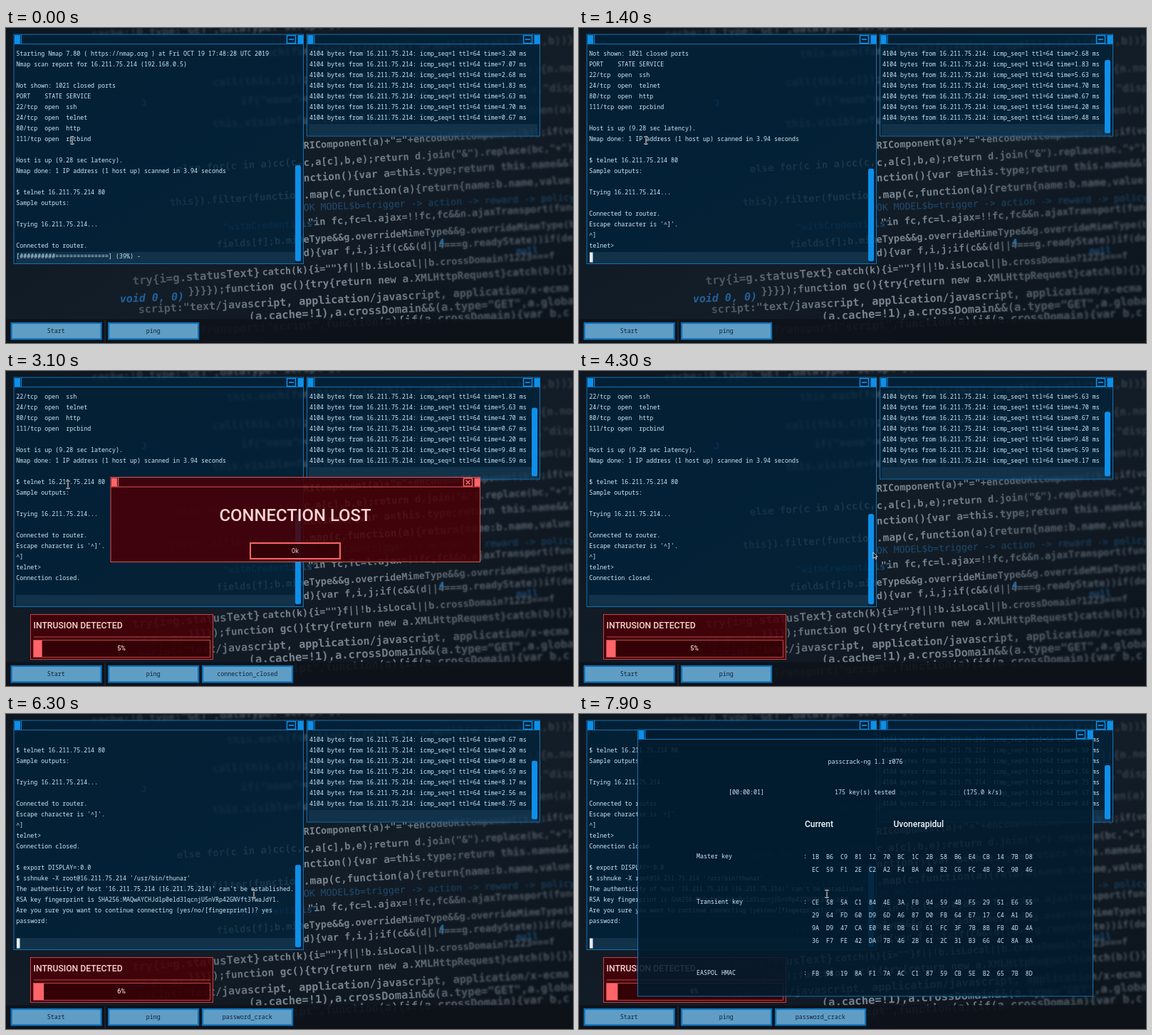
Write an HTML page that moves like this. It is 796 px wide and 443 px high and loops after 8 s.

```html
<!DOCTYPE html>
<html lang="en">
<head>
<meta charset="utf-8">
<title>Terminal desktop</title>
<style>
html, body { margin: 0; width: 100%; height: 100%; overflow: hidden; background: #0c131a; }
svg { display: block; width: 100vw; height: 100vh; }
text { white-space: pre; }
.mono { font: 8.333px "Roboto Mono", "Noto Sans Mono", "DejaVu Sans Mono", monospace; fill: #cfe9f8; }
.head { font: 500 12px Roboto, "Open Sans", sans-serif; fill: #f0f8fd; }
.mid { text-anchor: middle; }
.dark { fill: #0b2233; }
.pink { fill: #ffd3d3; }
.code { font: bold 14px "DejaVu Sans Mono", "Noto Sans Mono", monospace; }
</style>
</head>
<body>
<svg id="stage" viewBox="0 0 796 443" preserveAspectRatio="none">
  <defs>
    <linearGradient id="base" x2="1" y2="1">
      <stop offset="0" stop-color="#0d1721"/><stop offset=".55" stop-color="#131d27"/><stop offset="1" stop-color="#0b121a"/>
    </linearGradient>
    <linearGradient id="ink" gradientUnits="userSpaceOnUse" x1="0" x2="796">
      <stop offset="0" stop-color="#222d36"/><stop offset=".25" stop-color="#4a555f"/>
      <stop offset=".52" stop-color="#7b8791"/><stop offset=".75" stop-color="#6a7680"/><stop offset="1" stop-color="#46515b"/>
    </linearGradient>
    <linearGradient id="fade" gradientUnits="userSpaceOnUse" x1="560" x2="720">
      <stop offset="0" stop-color="#fff"/><stop offset="1" stop-color="#000"/>
    </linearGradient>
    <linearGradient id="rise" gradientUnits="userSpaceOnUse" x1="560" x2="720">
      <stop offset="0" stop-color="#000"/><stop offset="1" stop-color="#fff"/>
    </linearGradient>
    <mask id="nearMask" maskUnits="userSpaceOnUse" x="0" y="0" width="796" height="443"><rect width="796" height="443" fill="url(#fade)"/></mask>
    <mask id="farMask" maskUnits="userSpaceOnUse" x="0" y="0" width="796" height="443"><rect width="796" height="443" fill="url(#rise)"/></mask>
    <filter id="soft"><feGaussianBlur stdDeviation=".7"/></filter>
    <filter id="far"><feGaussianBlur stdDeviation="1.7"/></filter>
  </defs>
  <rect width="796" height="443" fill="url(#base)"/>
  <g id="wall"></g>
  <g id="desk"></g>
</svg>
<script>
const LOOP = 8000;
const BLUE = '#0d90ea', RED = '#ff6468';
const $ = id => document.getElementById(id);
const esc = s => s.replace(/&/g, '&amp;').replace(/</g, '&lt;');
const rect = (x, y, w, h, fill, more = '') => `<rect x="${x}" y="${y}" width="${w}" height="${h}" fill="${fill}" ${more}/>`;
const text = (x, y, s, cls = 'mono', more = '') => `<text x="${x}" y="${y}" class="${cls}" ${more}>${esc(s)}</text>`;
const path = (d, color, width = 1) => `<path d="${d}" fill="none" stroke="${color}" stroke-width="${width}"/>`;

// Wall of code: sharp on the left, out of focus on the right
const codeLine = (x, y, s, size = 14, tilt = -3.3, fill = 'url(#ink)', more = '') =>
  `<text class="code" transform="rotate(${tilt} ${x} ${y})" x="${x}" y="${y}" fill="${fill}" style="font-size:${size}px;${more}">${esc(s)}</text>`;

function wall() {
  const far = [
    [120, 14, 'cache:!0,type:"GET",dataType:"script"}).done(function(a){b.global'],
    [310, 42, 'this.each(function(b){n(this).wrapAll(a.call(this,b))}),this.each('],
    [290, 82, 'call(this,c)});return this.parent().each(function(){n.nodeName(this'],
    [330, 108, 'if("none"===(a.style&&a.style.display||n.css(a,"display")))return'],
    [290, 140, 'this.visible=function(a){return!n.expr.filters.hidden(a)};var cc']
  ];
  const near = [
    [418, 170, 'RIComponent(a)+"="+encodeURIComponent(b)};if(void', 13.5],
    [240, 203, 'else for(c in a)cc(c,', 14],
    [418, 194, 'c,a[c],b,e);return d.join("&").replace(bc,"+")};n', 13.7],
    [418, 216, 'nction(){var a=this.type;return this.name&&!n(th', 14.4],
    [230, 250, 'this}).filter(function', 14],
    [418, 240, '.map(c,function(a){return{name:b.name,value:a.rep', 14.5],
    [424, 278, '"in fc,fc=l.ajax=!!fc,fc&&n.ajaxTransport(function', 13.7],
    [296, 309, 'fields[f];b.mimeType&&g.overrideMimeType&&g.overrideMimeType(b.mime', 13.5],
    [418, 321, 'd){var f,i,j;if(c&&(d||4===g.readyState))if(delet', 13.7],
    [178, 361, 'try{i=g.statusText}', 15.7, -4],
    [360, 348, 'catch(k){i=""}f||!b.isLocal||b.crossDomain?1223===f', 13.4],
    [256, 375, '}}}});function gc(){try{return new a.XMLHttpRequest}catch(b){}}', 14.3],
    [186, 401, 'script:"text/javascript, application/javascript, application/x-ecma', 15, -2.9],
    [341, 411, '(a.cache=!1),a.crossDomain&&(a.type="GET",a.global=!1', 15.5, -2.8],
    [236, 432, 'ajaxTransport("script",function(a){if(a.crossDomain){var b,c', 15.4, -2.8]
  ];
  const blue = [
    [418, 257, 'OK MODEL$b=trigger -> action -> reward -> policy', 13.2, '#1f4b70', 'font-weight:400'],
    [160, 386, 'void 0, 0)', 15, '#236199', 'font-style:italic'],
    [305, 284, '"withCredentials"', 13, '#1e4a6e'],
    [608, 306, '4', 13, '#2f86c4'], [716, 318, 'null', 13, '#1f4f78'], [190, 110, 'J', 13, '#1c5a90']
  ];
  const lines = near.map(l => codeLine(...l)).join('') +
    blue.map(([x, y, s, size, c, more]) => codeLine(x, y, s, size, -2.2, c, more)).join('');
  return `<g filter="url(#far)" opacity=".6">${far.map(l => codeLine(...l, 15, -2.4)).join('')}</g>
    <g mask="url(#nearMask)"><g filter="url(#soft)">${lines}</g></g>
    <g mask="url(#farMask)"><g filter="url(#far)">${lines}</g></g>`;
}

// Window frame with end caps and one title button
function frame(x, y, w, h, fill, color, edge, cross) {
  const r = x + w, bx = r - 23, cy = y + 7;
  const sign = cross ? `M${bx + 3} ${y + 4}l6 6m0 -6l-6 6` : `M${bx + 2.5} ${cy}h7`;
  return rect(x, y, w, h, fill, `stroke="${edge}"`) +
    path(`M${x} ${y + 13.5}H${r}`, edge) +
    rect(x + 1, y + 1, 8, 12, color) + path(`M${x + 10.5} ${y}v13.5`, color) +
    rect(r - 8, y + 1, 8, 12, color) +
    rect(bx, y + 1.5, 12, 11, 'none', `stroke="${color}" stroke-width="1.5"`) +
    path(sign, color, 1.7);
}

const button = (x, label, id = '') => `<g id="${id}">` +
  rect(x + 1.6, 415, 126, 22.5, '#609dc5', 'stroke="#0b72b8" stroke-width="2.2"') +
  text(x + 64.3, 429, label, 'mono mid dark') + '</g>';

const rows = (id, x, y, n, step) =>
  Array.from({ length: n }, (_, i) => text(x, y + i * step, '', 'mono', `id="${id}${i}"`)).join('');

const HEX_ROWS = [204, 222, 268, 286, 304, 322, 368];

function desk() {
  const glass = 'rgba(1,35,59,.78)', blood = 'rgba(72,0,6,.87)', strip = 'rgba(130,190,225,.11)';
  return rect(0, 409.5, 796, 34, 'rgba(14,19,26,.94)') + path('M139 411V442', '#2b3742') +
    button(6, 'Start') + button(142.5, 'ping') +
    button(274.5, 'connection_closed', 'lostTask') + button(274.5, 'password_crack', 'crackTask') +
    frame(11, 9, 406.5, 322.5, glass, BLUE, '#1273b4') + rect(14, 315, 392, 16, strip) +
    rows('term', 14.2, 38.5, 19, 15) + text(14.2, 323.5, '', 'mono', 'id="entry"') +
    rect(15, 315.5, 4.5, 14, '#e3eaee', 'id="caret"') +
    rect(406, 193, 8, 135, BLUE, 'id="termBar" rx="2.5"') +
    frame(422.5, 9, 327, 143, glass, BLUE, '#1273b4') + rect(425, 135, 321, 16, strip) +
    rows('ping', 426, 38.5, 7, 15) + rect(738, 45, 8, 103, BLUE, 'id="pingBar" rx="2.5"') +
    '<g id="alarm">' + rect(34.5, 342.5, 256, 63, blood, 'stroke="#c2444a"') +
    text(38.5, 362, 'INTRUSION DETECTED', 'head pink', 'style="font-size:12.2px"') +
    path('M39 374H287', '#c2444a') + rect(38.5, 378.5, 248, 24, 'rgba(40,0,4,.5)', 'stroke="#c2444a"') +
    rect(39, 379, 12, 23, RED, 'id="level"') +
    text(162, 393.3, '', 'head mid pink', 'id="percent" style="font-size:9px"') + '</g>' +
    '<g id="lost">' + frame(147, 149.5, 518.5, 119, blood, RED, '#d8545a', true) +
    text(406, 211.3, 'CONNECTION LOST', 'head mid pink', 'style="font-size:23.9px"') +
    rect(343, 242, 126, 22, 'rgba(45,0,4,.6)', `stroke="${RED}" stroke-width="2"`) +
    text(406, 256, 'Ok', 'mono mid pink') + '</g>' +
    '<g id="crack">' + frame(82.5, 22, 639, 375, 'rgba(2,28,46,.88)', BLUE, '#1273b4') +
    text(402, 70, 'passcrack-ng 1.1 r076', 'mono mid') +
    text(210, 113, '', 'mono', 'id="clock"') + text(401.5, 113, '', 'mono mid', 'id="tested"') +
    text(566.5, 113, '', 'mono mid', 'id="rate"') +
    text(317, 159, 'Current', 'head') + text(441.5, 159, '', 'head', 'id="guess"') +
    [['Master key', 203], ['Transient key', 267], ['EASPOL HMAC', 367]]
      .map(([s, y]) => text(165, y, s) + text(315, y, ':')).join('') +
    HEX_ROWS.map((y, i) => text(327, y, '', 'mono', `id="hex${i}"`)).join('') + '</g>' +
    '<g id="mouse">' +
    '<g id="beam">' + path('M-2.5 -5H-.7L0 -4.3L.7 -5H2.5M0 -4.3V4.3M-2.5 5H-.7L0 4.3L.7 5H2.5', '#fff', 2) +
    path('M-2.5 -5H-.7L0 -4.3L.7 -5H2.5M0 -4.3V4.3M-2.5 5H-.7L0 4.3L.7 5H2.5', '#111', 1) + '</g>' +
    '<path id="arrow" d="M0 0V8.5L2 6.7L3.4 9.6L4.8 9L3.5 6.1H6.2Z" fill="#111" stroke="#fff" stroke-width=".8"/></g>';
}

$('wall').innerHTML = wall();
$('desk').innerHTML = desk();

const IP = '16.211.75.214';
const EXPORT = '$ export DISPLAY=:0.0';
const NUKE = `$ sshnuke -X root@${IP} '/usr/bin/thunar'`;
const LOG = [
  'Starting Nmap 7.80 ( https://nmap.org ) at Fri OCT 19 17:48:28 UTC 2019',
  `Nmap scan report for ${IP} (192.168.0.5)`, '',
  'Not shown: 1021 closed ports', 'PORT    STATE SERVICE',
  '22/tcp  open  ssh', '24/tcp  open  telnet', '80/tcp  open  http', '111/tcp open  rpcbind', '',
  'Host is up (9.28 sec latency).',
  'Nmap done: 1 IP address (1 host up) scanned in 3.94 seconds', '',
  `$ telnet ${IP} 80`, 'Sample outputs:', '', `Trying ${IP}...`, '', 'Connected to router.',
  "Escape character is '^]'.", '^]', 'telnet>', 'Connection closed.', '',
  EXPORT, NUKE,
  `The authenticity of host '${IP} (${IP})' can't be established.`,
  'RSA key fingerprint is SHA256:MAQwAYCHJdlp0eld31qcnjU5nVRp42GNVft3YwaJdY1.',
  'Are you sure you want to continue connecting (yes/no/[fingerprint])? yes', 'password:', ''
];
const LOG_TIMES = [800, 1000, 1200, 1700, 1800, 5000, 5600, 5700, 5800, 6000, 6100, 6200];
const PINGS = [3.2, 7.07, 2.68, 1.83, 5.63, 4.7, .67, 4.2, 9.48, 6.59, 8.17, 2.56, 8.75, 5.57, .44];
const PING_TIMES = [400, 1300, 2200, 3600, 5000, 5900, 6700, 7500];
const GUESSES = ['Ravunelo', 'Opelimuvat', 'Zumikore', 'Fenulidavo', 'Ubesarolin',
  'Uvonerapidul', 'Lemuvado', 'Kirovanesu', 'Adulemik', 'Pozerinuval'];
const MOUSE = [[0, 93, 158], [1400, 94, 158], [1700, 94, 158], [2300, 87, 160], [3100, 87, 160],
  [3800, 408, 254], [4200, 408, 254], [4300, 413, 255], [4400, 413, 255], [5000, 348, 253], [LOOP, 348, 253]];

const passed = (times, t) => times.filter(at => t >= at).length;
const put = (id, s) => { if ($(id).textContent !== s) $(id).textContent = s; };
const show = (id, o) => { $(id).style.opacity = +o; };
const typed = (s, t, from, to) => s.slice(0, 2 + Math.floor((s.length - 2) * (t - from) / (to - from)));

function bar(id, height, bottom) {
  $(id).setAttribute('y', bottom - height);
  $(id).setAttribute('height', height);
}

function entryText(t) {
  if (t < 800) {
    const step = passed([100, 300, 400, 500, 600], t), pct = Math.min(100, 39 + 13 * step);
    const n = Math.ceil(pct / 4);
    return `[${'#'.repeat(n)}${'='.repeat(25 - n)}] (${pct}%) ${'-\\|/'[step % 4]}`;
  }
  if (t >= 4500 && t < 5000) return typed(EXPORT, t, 4500, 4900);
  if (t >= 5000 && t < 5600) return typed(NUKE, t, 5000, 5500);
  return '';
}

function drawTerminal(t) {
  const n = 19 + passed(LOG_TIMES, t);
  for (let i = 0; i < 19; i++) put('term' + i, LOG[n - 19 + i]);
  bar('termBar', 135 - 1.6 * (n - 19), 328);
  const entry = entryText(t);
  put('entry', entry);
  $('caret').setAttribute('x', 15 + 5 * entry.length);
  show('caret', t >= 1200 && t < 1700 || t >= 4500 && t < 5600 || t >= 6200);
}

function drawPing(t) {
  const skip = passed(PING_TIMES, t), n = 7 + skip;
  for (let i = 0; i < 7; i++)
    put('ping' + i, `4104 bytes from ${IP}: icmp_seq=1 ttl=64 time=${PINGS[skip + i].toFixed(2)} ms`);
  bar('pingBar', 35.5 + 607 / n, 148);
  show('pingBar', skip > 0);
}

function drawCrack(t) {
  show('crack', t < 6500 ? 0 : t < 6600 ? .5 : 1);
  if (t < 6500) return;
  const step = (t - 6400) / 100, keys = 67 + 12 * (step - 6), late = t >= 7500;
  put('clock', late ? '[00:00:01]' : '[00:00:00]');
  put('tested', keys + ' key(s) tested');
  put('rate', late ? `(${keys}.0 k/s)` : '(inf.0 k/s)');
  put('guess', GUESSES[step % 10]);
  let seed = step * 7919 + 17;
  const byte = () => {
    seed = (seed * 1103515 + 12345) % 2147483647;
    return (seed >> 9 & 255).toString(16).toUpperCase().padStart(2, '0');
  };
  HEX_ROWS.forEach((_, i) => put('hex' + i, Array.from({ length: 16 }, byte).join('  ')));
}

function drawAlerts(t) {
  show('lost', t < 1900 || t >= 4300 ? 0 : t < 2000 || t >= 4200 ? .5 : 1);
  show('lostTask', t >= 1900 && t < 4300);
  show('crackTask', t >= 6300);
  show('alarm', t >= 2200);
  const pct = 4.7 + (t - 3100) * .00031;
  $('level').setAttribute('width', Math.max(0, pct * 2.48));
  put('percent', Math.round(pct) + '%');
}

function drawMouse(t) {
  const k = Math.max(1, MOUSE.findIndex(m => m[0] > t));
  const [t0, x0, y0] = MOUSE[k - 1], [t1, x1, y1] = MOUSE[k];
  const u = (t - t0) / (t1 - t0), e = u * u * (3 - 2 * u);
  const x = x0 + (x1 - x0) * e, y = y0 + (y1 - y0) * e;
  $('mouse').setAttribute('transform', `translate(${x} ${y})`);
  const onText = x < 405 && !(t > 3100 && t < 4300 && x > 147);
  show('beam', onText);
  show('arrow', !onText);
}

let last = -1;
const start = performance.now();
function tick(now) {
  const t = Math.floor(Math.max(0, now - start) % LOOP / 100) * 100;
  if (t !== last) {
    last = t;
    [drawTerminal, drawPing, drawCrack, drawAlerts, drawMouse].forEach(draw => draw(t));
  }
  requestAnimationFrame(tick);
}
tick(start);
</script>
</body>
</html>
```
